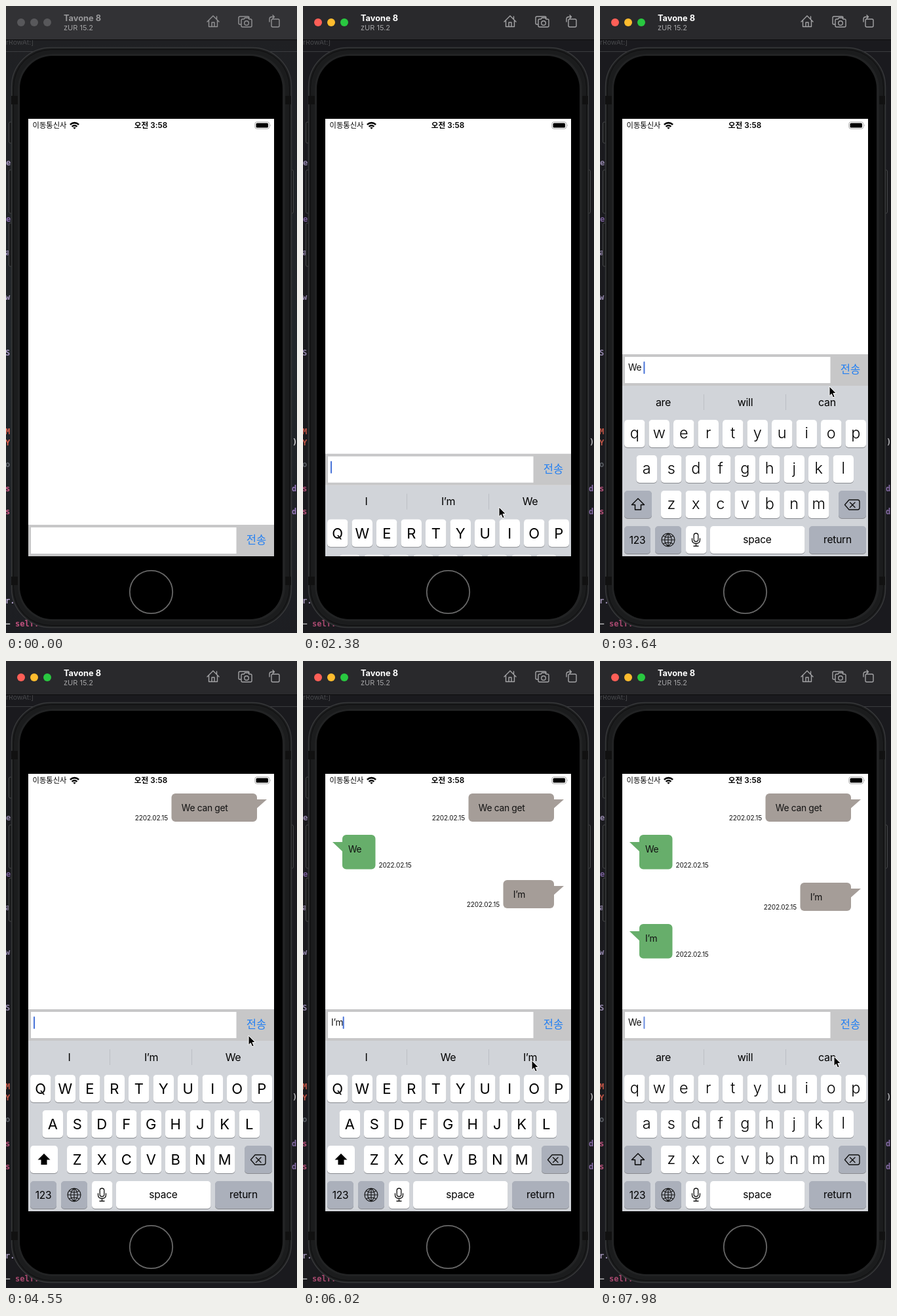
These frames come from a looping animation (444x956 px, 8000 ms). An HTML page:

```html
<!DOCTYPE html>
<html lang="ko">
<head>
<meta charset="utf-8">
<title>Chat simulator</title>
<style>
html, body { margin: 0; width: 100%; height: 100%; overflow: hidden; background: #1b1c1f; }
svg { display: block; width: 444px; height: 956px; font-family: Inter, "Noto Sans CJK KR", sans-serif; }
text { white-space: pre; }
.mid { text-anchor: middle; }
.msg { font-size: 13.8px; letter-spacing: -.3px; fill: #111; }
.date { font-size: 10px; letter-spacing: -.15px; fill: #111; }
.code { font: 700 12px "DejaVu Sans Mono", monospace; }
.line { fill: none; stroke-linecap: round; stroke-linejoin: round; }
.hint { font-size: 16px; letter-spacing: -.3px; }
</style>
</head>
<body>
<svg id="stage" viewBox="0 0 444 956"></svg>
<script>
const LOOP = 8000;
const clamp = v => Math.max(0, Math.min(1, v));
const ramp = (t, from, span) => clamp((t - from) / span);
const rect = (x, y, w, h, fill, r = 0, more = '') =>
  `<rect x="${x}" y="${y}" width="${w}" height="${h}" rx="${r}" fill="${fill}" ${more}/>`;
const text = (x, y, s, more = '') => `<text x="${x}" y="${y}" ${more}>${s}</text>`;
const path = (d, more = '') => `<path d="${d}" ${more}/>`;
const line = (d, color, width = 1.4) => path(d, `class="line" stroke="${color}" stroke-width="${width}"`);

// Hints shown above the keyboard
const START = ['I', 'I’m', 'We'], RECENT = ['I', 'We', 'I’m'];
const AFTER_WE = ['are', 'will', 'can'], AFTER_CAN = ['be', 'do', 'get'];
const AFTER_GET = ['it', 'the', 'a'], AFTER_IM = ['not', 'so', 'going'];

// Time, field text, hints
const typing = [
  [0, '', START],
  [3150, 'We', START], [3220, 'We ', AFTER_WE],
  [3920, 'We can ', AFTER_CAN], [4060, 'We can get ', AFTER_GET],
  [4340, '', START],
  [4760, 'We', START], [4830, 'We ', AFTER_WE],
  [5110, '', RECENT],
  [5460, 'I’m', RECENT], [5530, 'I’m ', AFTER_IM],
  [5670, '', RECENT],
  [6020, 'I’m', RECENT], [6090, 'I’m ', AFTER_IM],
  [6440, '', START],
  [7420, 'We', START], [7490, 'We ', AFTER_WE]
];

// Time, x, y of the pointer tip
const route = [
  [560, 330, 640], [1050, 299, 784], [1190, 299, 784], [1260, 295, 764],
  [1400, 295, 764], [1540, 299, 764], [2620, 299, 764], [3080, 347, 606],
  [3430, 347, 606], [3640, 350, 580], [3850, 347, 603], [4060, 347, 603],
  [4270, 378, 559], [4480, 378, 559], [4690, 348, 604], [4830, 348, 604],
  [5040, 378, 559], [5230, 378, 559], [5390, 348, 606], [5500, 348, 606],
  [5640, 378, 559], [5790, 378, 559], [5950, 349, 609], [6060, 349, 609],
  [6230, 378, 559], [7070, 378, 559], [7280, 357, 603], [LOOP, 357, 603]
];

// Time, text, top, left edge of a sent bubble (0 for a received one)
const bubbles = [
  [4410, 'We can get', 202, 252.5], [5250, 'We', 265, 0],
  [5740, 'I’m', 338, 305.5], [6510, 'I’m', 401, 0]
];

function bubble([, words, y, x], i) {
  const body = x
    ? rect(x, y, 383 - x, 43, '#a59d98', 6) + path(`M380 ${y + 9}H398L380 ${y + 25}Z`, 'fill="#a59d98"') +
      text(x + 15.3, y + 26.5, words, 'class="msg"') +
      text(x - 5.5, y + 41, '2202.02.15', 'class="date" text-anchor="end"')
    : rect(60, y, 50.5, 52.5, '#67ae6b', 6) + path(`M64 ${y + 11}H45L64 ${y + 29}Z`, 'fill="#67ae6b"') +
      text(69, y + 26.5, words, 'class="msg"') + text(115.5, y + 50, '2022.02.15', 'class="date"');
  return `<g id="bubble${i}">${body}</g>`;
}

const key = (x, y, w, fill = '#fff') =>
  rect(x, y + 1, w, 42, '#898b90', 5) + rect(x, y, w, 42, fill, 5);

function keyboard() {
  const grey = '#abb0bb';
  const rows = [['QWERTYUIOP', 37, 631], ['ASDFGHJKL', 55.5, 685], ['ZXCVBNM', 93, 739]];
  let keys = '', upper = '', lower = '';
  for (const [letters, x0, y] of rows) {
    [...letters].forEach((c, i) => {
      const x = x0 + i * 37.5;
      keys += key(x, y, 31.5);
      upper += text(x + 15.75, y + 29, c);
      lower += text(x + 15.75, y + 27.5, c.toLowerCase());
    });
  }
  const arrow = 'M58 751L48.5 760.5H53.5V768H62.5V760.5H67.5Z';
  return rect(34, 579, 375, 260, '#d1d4d9') +
    [158.5, 283.5].map(x => rect(x - .5, 592, 1, 24, '#bcbfc5')).join('') +
    '<g id="oldHints" class="mid hint"></g><g id="newHints" class="mid hint"></g>' + keys +
    `<g id="upper" class="mid" font-size="22">${upper}${key(37, 739, 42)}${path(arrow)}</g>` +
    `<g id="lower" class="mid" font-size="23.5" font-weight="300">${lower}${key(37, 739, 42, grey)}${line(arrow, '#000')}</g>` +
    key(364, 739, 42, grey) +
    line('M380 753H393Q396 753 396 756V765Q396 768 393 768H380L373.5 760.5Z M381.5 757L389 764.5M389 757L381.5 764.5', '#111') +
    key(37, 793, 40, grey) + key(84, 793, 40, grey) + key(131, 793, 31.5) +
    key(168, 793, 144.5) + key(319, 793, 87, grey) +
    `<g class="mid" font-size="15.5" letter-spacing="-.2">${text(57, 820, '123')}${text(240, 819, 'space')}${text(362.5, 819, 'return')}</g>` +
    line('M94 814a10 10 0 1 0 20 0a10 10 0 1 0-20 0H114M104 804V824M104 804c-7 6-7 14 0 20c7-6 7-14 0-20M96.5 808Q104 812 111.5 808M96.5 820Q104 816 111.5 820', '#111', 1.1) +
    rect(143.2, 804, 6.6, 12.5, 'none', 3.3, 'stroke="#111" stroke-width="1.3"') +
    line('M140.5 812V814Q140.5 819.5 146.5 819.5Q152.5 819.5 152.5 814V812M146.5 820V823.5M143 823.5H150', '#111', 1.3);
}

function backdrop() {
  const code = [
    [0, 243, 'e', '#a99ac4'], [0, 329, 'e', '#8a6cb0'], [-1, 380, 'a', '#a99ac4'],
    [-1, 448, 'w', '#a99ac4'], [-1, 533, 'S', '#a99ac4'], [-1, 653, 'M', '#e0614f'],
    [-1, 670, 'Y', '#e0614f'], [-1, 703, 'o', '#666b72'], [-1, 740, 's', '#d55c8c'],
    [-1, 775, 's', '#d55c8c'], [437, 669, ')', '#d0d0d2'], [436, 740, 'd', '#9a7bc0'],
    [436, 775, 'd', '#9a7bc0'], [-1, 911, 'r.', '#b8a8d0'], [-1, 946, '—', '#c8c8ca'],
    [14, 946, 'self:.', '#c3527f']
  ];
  return rect(0, 0, 444, 956, '#1a1a1e') +
    rect(0, 52, 444, 904, 'url(#glow)', 0, 'id="lit"') +
    `<g id="code" class="code">${code.map(([x, y, s, c]) => text(x, y, s, `fill="${c}"`)).join('')}</g>` +
    text(0, 59, 'rRowAt:]', 'font-size="10.5" fill="#47484b"') + rect(0, 69, 444, 1, '#3b3c3f');
}

function device() {
  const side = (x, y, h) => rect(x, y, 8, h, '#18191a', 2, 'stroke="#47484a"');
  const bands = [137, 870].map(y => rect(8, y, 13, 13, '#111') + rect(422, y, 13, 13, '#111')).join('');
  return side(4.5, 177, 32) + side(4.5, 250, 66) + side(4.5, 331, 66) + side(430.5, 250, 66) +
    rect(8.5, 63.5, 427, 884, '#1b1c1d', 60, 'stroke="#37383a" stroke-width="1.5"') +
    rect(11.5, 66.5, 421, 878, 'none', 57, 'stroke="#0e0e0f" stroke-width="1"') + bands +
    rect(18, 73, 408, 865, '#222324', 53) + rect(21, 76, 401, 859, '#000', 50) +
    '<circle cx="221.5" cy="893.5" r="32.7" fill="#000" stroke="#686868" stroke-width="1.8"/>';
}

function titleBar() {
  const lights = [23, 43, 63].map(x => `<circle class="light" cx="${x}" cy="25" r="6"/>`).join('');
  return rect(0, 0, 444, 51, '#29292c', 0, 'id="bar"') + rect(0, 51, 444, 1, '#0c0c0d') + lights +
    text(88, 23, 'Tavone 8', 'id="title" font-size="12.8" font-weight="700"') +
    text(88, 37, 'zUR 15.2', 'font-size="11" fill="#a3a3a5"') +
    `<g id="tools" class="line" stroke="#a3a3a5" stroke-width="1.4">
      <path d="M307 24L316 15L325 24M309.5 22V31.5H322.5V22M321.5 20V16M314 31V25H318V31"/>
      <path d="M358 28H356.500Q355 28 355 26V18Q355 16 357 16H369Q371 16 371 18M360 20H363L364.500 18H369.500L371 20H373Q375 20 375 22V30Q375 32 373 32H361Q359 32 359 30V22Q359 20 361 20"/>
      <circle cx="367" cy="26" r="3.3"/>
      <rect x="405" y="20" width="12" height="12" rx="2"/>
      <path d="M402 24V20Q402 16.500 406 16.500H409M407 14L409.500 16.500L407 19"/></g>`;
}

function screen() {
  const status = text(40.5, 186, '이동통신사', 'font-size="11.3"') +
    text(221, 186, '오전 3:58', 'class="mid" font-size="11.7" font-weight="600"') +
    path('M97 180Q104.500 173.500 112 180L110.300 181.800Q104.500 177 98.700 181.800Z M99.700 182.900Q104.500 179 109.300 182.900L107.500 184.700Q104.500 182.300 101.500 184.700Z M102.300 185.500Q104.500 183.800 106.700 185.500L104.500 187.700Z') +
    rect(379.8, 176.8, 22, 10.4, '#fff', 3, 'stroke="#aaa"') + rect(381.5, 178.5, 18.5, 7, '#000', 1.6) +
    path('M403 180q1.800 2 0 4z', 'fill="#aaa"');
  const input = rect(34, 531, 375, 48, '#c7c7c8') + rect(38, 535, 313.5, 40, '#fff') +
    text(382, 560, '전송', 'class="mid" font-size="16.500" fill="#217ff3"') +
    text(43, 556, '', 'id="field" class="msg"') + rect(42, 542, 2, 19, '#4873d8', 1, 'id="caret"');
  return `<g clip-path="url(#glass)">${rect(34, 172, 375, 667, '#fff')}${status}${bubbles.map(bubble).join('')}
    <g id="panel">${keyboard()}${input}</g></g>`;
}

const $ = id => document.getElementById(id);
const set = (id, name, value) => $(id).setAttribute(name, value);
$('stage').innerHTML = `<defs>
  <clipPath id="glass"><rect x="34" y="172" width="375" height="667"/></clipPath>
  <linearGradient id="glow" x2="0" y2="1"><stop stop-color="#1f2023"/><stop offset=".55" stop-color="#22272b"/><stop offset="1" stop-color="#1d1e22"/></linearGradient>
  </defs>${backdrop()}${device()}${titleBar()}${screen()}
  <path id="pointer" d="M0 0V14.500L3.300 11.500L5.600 17L8.200 15.900L5.900 10.500H10.300Z" fill="#000" stroke="#fff" stroke-width="1" stroke-linejoin="round"/>`;
const lights = [...document.querySelectorAll('.light')];

function pointerAt(t) {
  const i = Math.max(1, route.findIndex(p => p[0] > t));
  const [t0, x0, y0] = route[i - 1], [t1, x1, y1] = route[i];
  const u = ramp(t, t0, t1 - t0), e = u * u * (3 - 2 * u);
  return [x0 + (x1 - x0) * e, y0 + (y1 - y0) * e];
}

// Critically damped spring
function panelOffset(t) {
  const x = Math.max(0, t - 2303) * .01826;
  return 260 * (1 + x) * Math.exp(-x);
}

function caretOpacity(t) {
  if (t < 2310) return ramp(t, 1350, 130) * (1 - ramp(t, 1750, 140));
  return 1 - .35 * ramp(t, 7960, 40);
}

const hints = words => words.map((w, i) => text(96.5 + 125 * i, 609.5, w)).join('');

function draw(t) {
  const active = t >= 490;
  set('lit', 'opacity', 1 - ramp(t, 70, 210));
  set('code', 'opacity', 1 - .15 * ramp(t, 70, 210));
  set('bar', 'fill', active ? '#29292c' : '#323235');
  set('title', 'fill', active ? '#fff' : '#98989a');
  set('tools', 'opacity', active ? 1 : .85);
  lights.forEach((el, i) => el.setAttribute('fill', active ? ['#fe5f57', '#febc2e', '#29c840'][i] : '#58585b'));

  const [x, y] = pointerAt(t);
  set('pointer', 'transform', `translate(${x} ${y})`);
  set('pointer', 'opacity', t < 560 ? 0 : 1);
  set('panel', 'transform', `translate(0 ${panelOffset(t)})`);

  const step = typing.findLastIndex(s => t >= s[0]);
  const [since, words, now] = typing[step];
  const before = typing[Math.max(0, step - 1)][2];
  const mix = before === now ? 1 : ramp(t, since, 140);
  const lower = words.endsWith(' ');
  $('oldHints').innerHTML = mix < 1 ? hints(before) : '';
  $('newHints').innerHTML = hints(now);
  set('oldHints', 'opacity', 1 - mix);
  set('newHints', 'opacity', mix);
  set('upper', 'display', lower ? 'none' : 'inline');
  set('lower', 'display', lower ? 'inline' : 'none');
  $('field').textContent = words;
  set('caret', 'x', words ? 43 + $('field').getComputedTextLength() - .5 : 42);
  set('caret', 'opacity', caretOpacity(t));

  bubbles.forEach(([from], i) => set('bubble' + i, 'opacity', ramp(t, from, 140)));
  set('bubble2', 'transform', `translate(0 ${t < 6510 ? -4 : 0})`);
}

function tick() {
  draw(performance.now() % LOOP);
  requestAnimationFrame(tick);
}
tick();
</script>
</body>
</html>
```
